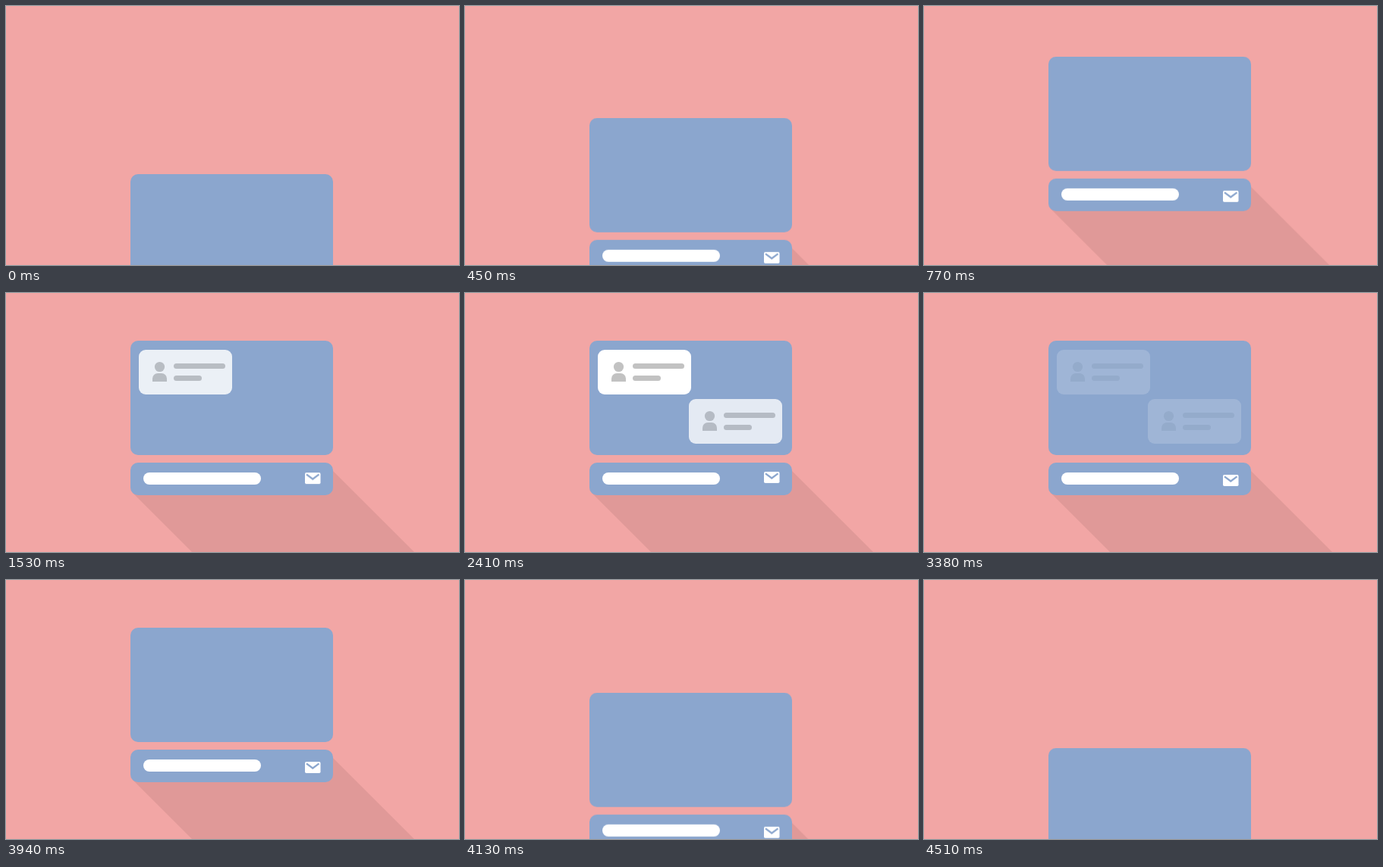
Recreate the animation shown at these times as an HTML page. Size 597 by 342 pixels, loop 4980 ms.

```html
<!DOCTYPE html>
<html lang="en">
<head>
<meta charset="utf-8">
<title>Chat window</title>
<style>
  :root { --loop: 4980ms; --out: cubic-bezier(0, 0, .5, 1); --blue: #8ba6ce; }
  html, body { margin: 0; width: 100%; height: 100%; overflow: hidden; background: #f2a6a5; }
  svg { display: block; width: 597px; height: 342px; }

  .window, .mail, .card { animation: var(--loop) linear infinite; }
  .window { animation-name: rise; }
  .mail { animation-name: hop; }
  .first { animation-name: first; }
  .second { animation-name: second; }

  .blue { fill: var(--blue); }
  .white { fill: #fff; }
  .grey { fill: #c2c2c2; }
  .shadow { fill: #e09998; }
  .flap { fill: none; stroke: var(--blue); stroke-width: 2.2; }

  @keyframes rise {
    0% { transform: translateY(159px); }
    5.663% { transform: translateY(159px); animation-timing-function: var(--out); }
    17.912% { transform: translateY(0); }
    79.177% { transform: translateY(0); animation-timing-function: var(--out); }
    91.225%, 100% { transform: translateY(159px); }
  }

  /* the envelope hops each time a message is sent */
  @keyframes hop {
    0% { transform: translateY(0); }
    24.237% { transform: translateY(0); animation-timing-function: var(--out); }
    28.253% { transform: translateY(-6px); animation-timing-function: var(--out); }
    36.386% { transform: translateY(0); }
    42.69% { transform: translateY(0); animation-timing-function: var(--out); }
    46.707% { transform: translateY(-6px); animation-timing-function: var(--out); }
    54.739%, 100% { transform: translateY(0); }
  }

  /* both cards fade together, with a short hold before they vanish */
  @keyframes first {
    0% { opacity: 0; }
    24.237% { opacity: 0; animation-timing-function: var(--out); }
    36.386% { opacity: 1; }
    60.683% { opacity: 1; animation-timing-function: cubic-bezier(.33, .43, .67, .77); }
    67.871%, 71.48% { opacity: .18; }
    71.486% { opacity: .02; }
    72.49%, 100% { opacity: 0; }
  }
  @keyframes second {
    0% { opacity: 0; }
    42.69% { opacity: 0; animation-timing-function: var(--out); }
    54.739% { opacity: 1; }
    60.683% { opacity: 1; animation-timing-function: cubic-bezier(.33, .43, .67, .77); }
    67.871%, 71.48% { opacity: .18; }
    71.486% { opacity: .02; }
    72.49%, 100% { opacity: 0; }
  }
</style>
</head>
<body>
<svg viewBox="0 0 597 342">
  <defs>
    <g id="message">
      <rect class="white" width="123" height="59" rx="9"/>
      <g class="grey">
        <circle cx="27.5" cy="22.5" r="6.6"/>
        <path d="M18 42v-4a7 7 0 0 1 7-7h5a7 7 0 0 1 7 7v4z"/>
        <rect x="46" y="18" width="68" height="7" rx="3.5"/>
        <rect x="46" y="34" width="37" height="7" rx="3.5"/>
      </g>
    </g>
  </defs>

  <g class="window">
    <path class="shadow" d="M167 264L428 232 728 532 728 564 467 564z"/>
    <rect class="blue" x="164" y="63" width="267" height="151" rx="10"/>
    <rect class="blue" x="164" y="224" width="267" height="43" rx="10"/>
    <rect class="white" x="181" y="237" width="155" height="16" rx="8"/>

    <g class="mail">
      <rect class="white" x="394" y="240" width="20.5" height="15" rx="1.8"/>
      <path class="flap" d="M396 242.3l8.25 6.2 8.25-6.2"/>
    </g>

    <g class="card first"><use href="#message" x="175" y="75"/></g>
    <g class="card second"><use href="#message" x="295" y="140"/></g>
  </g>
</svg>
</body>
</html>
```
